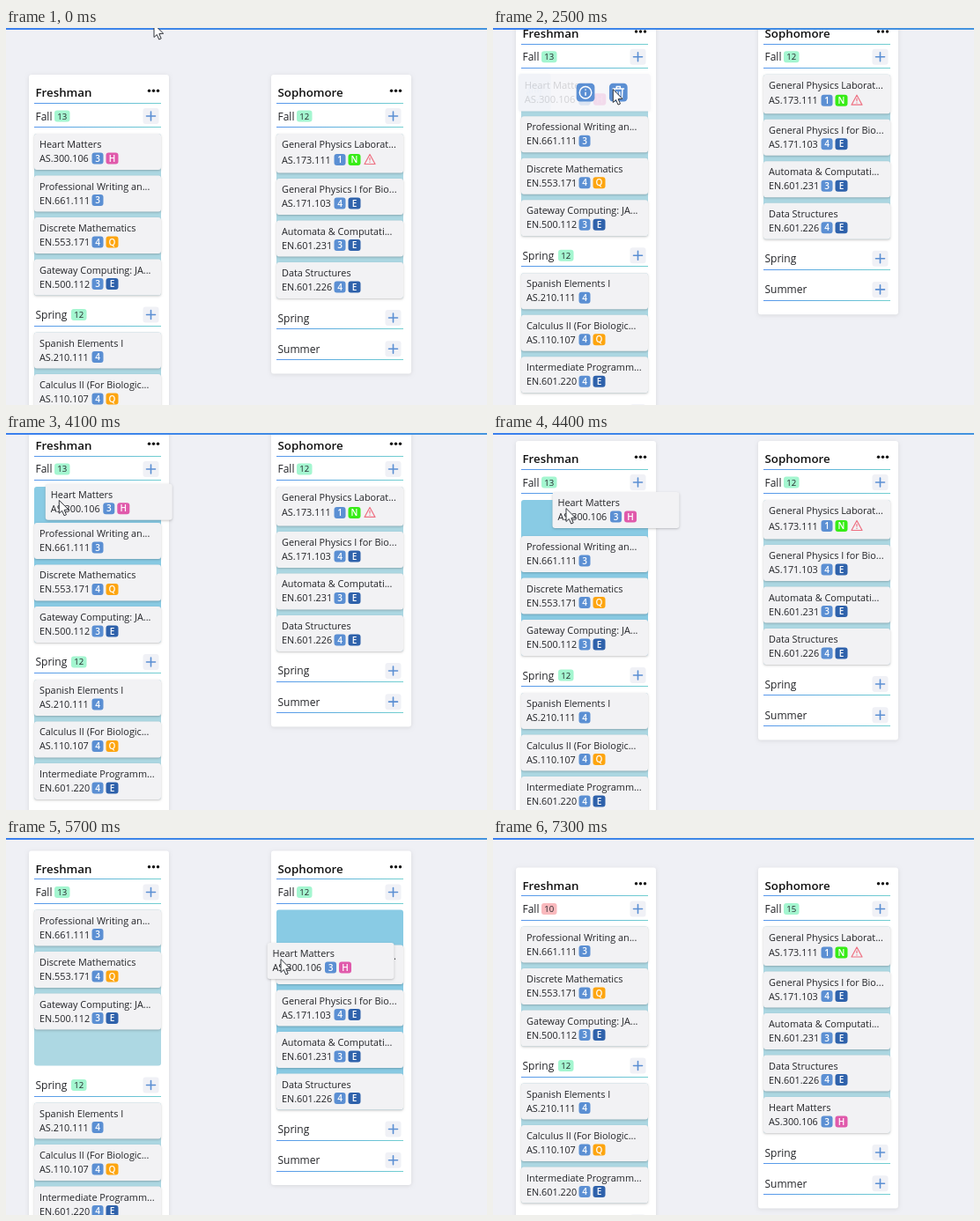
These frames come from a looping animation (546 px wide and 428 px high, 7400 ms). An HTML page with a canvas:

```html
<!DOCTYPE html>
<html lang="en">
<head>
<meta charset="utf-8">
<title>Course planner</title>
<style>
html, body { margin: 0; width: 100%; height: 100%; overflow: hidden; background: #eff0f5; }
canvas { display: block; width: 546px; height: 428px; }
</style>
</head>
<body>
<canvas id="stage"></canvas>
<script>
const W = 546, H = 428, LOOP = 7400;
const CARD_W = 144, CARD_H = 41, GAP = 6.5;
const GRAB = 3750, DROP = 5700, SETTLED = 6000, SAVED = 6400;
const INK = '#222327', BLUE = '#5b8fd3', LIST = '#add8e3', LIST_OVER = '#89cbe4';
const FONT = '"Open Sans", "Noto Sans", sans-serif';
const TINTS = { H: '#e05aab', Q: '#fda50f', E: '#2f62ab', N: '#37ec16' };

const canvas = document.getElementById('stage');
const ctx = canvas.getContext('2d');
const dpr = window.devicePixelRatio || 1;
canvas.width = W * dpr;
canvas.height = H * dpr;

const card = (title, code, credits, area, warn) =>
  ({ title, code, credits, area, warn, h: warn ? 44.5 : CARD_H });

const heart = card('Heart Matters', 'AS.300.106', 3, 'H');
const freshFall = [
  card('Professional Writing an...', 'EN.661.111', 3),
  card('Discrete Mathematics', 'EN.553.171', 4, 'Q'),
  card('Gateway Computing: JA...', 'EN.500.112', 3, 'E')
];
const freshSpring = [
  card('Spanish Elements I', 'AS.210.111', 4),
  card('Calculus II (For Biologic...', 'AS.110.107', 4, 'Q'),
  card('Intermediate Programm...', 'EN.601.220', 4, 'E')
];
const sophFall = [
  card('General Physics Laborat...', 'AS.173.111', 1, 'N', true),
  card('General Physics I for Bio...', 'AS.171.103', 4, 'E'),
  card('Automata & Computati...', 'EN.601.231', 3, 'E'),
  card('Data Structures', 'EN.601.226', 4, 'E')
];

// Time, then one or more values; eased between neighbours.
const SCROLL = [[1750, 0], [2450, 67.3], [3900, 67.3], [4400, 44], [4650, 38.5], [6600, 38.5], [7100, 19.5]];
const POINTER = [
  [0, 168, -4], [400, 168, 2], [1250, 142, 131], [1750, 142, 132], [2450, 138, 70],
  [3100, 40, 73], [3500, 38, 73], [3750, 47, 72], [4000, 56, 75], [4400, 83, 86],
  [5100, 284, 126], [5600, 312, 138], [6450, 312, 138], [6900, 296, -24]
];

const clamp = v => Math.max(0, Math.min(1, v));
const ease = v => v * v * (3 - 2 * v);
const ramp = (t, from, to) => ease(clamp((t - from) / (to - from)));
const mix = (a, b, k) => a + (b - a) * k;

function track(keys, t) {
  let i = 0;
  while (i < keys.length - 2 && t > keys[i + 1][0]) i++;
  const a = keys[i], b = keys[i + 1], k = ramp(t, a[0], b[0]);
  return a.slice(1).map((v, n) => mix(v, b[n + 1], k));
}

function box(x, y, w, h, r, fill) {
  ctx.fillStyle = fill;
  ctx.beginPath();
  ctx.roundRect(x, y, w, h, r);
  ctx.fill();
}

function shadow(alpha, blur, dy) {
  ctx.shadowColor = `rgba(0,0,0,${alpha})`;
  ctx.shadowBlur = blur * dpr;
  ctx.shadowOffsetY = dy * dpr;
}

function label(str, x, y, size, color = INK, weight = 400, align = 'left') {
  ctx.font = `${weight} ${size}px ${FONT}`;
  ctx.textAlign = align;
  ctx.fillStyle = color;
  ctx.fillText(str, x, y);
}

function stroke(color, width, build) {
  ctx.strokeStyle = color;
  ctx.lineWidth = width;
  ctx.lineCap = ctx.lineJoin = 'round';
  ctx.beginPath();
  build();
  ctx.stroke();
}

function poly(points) {
  points.forEach(([x, y], i) => i ? ctx.lineTo(x, y) : ctx.moveTo(x, y));
}

function gradient(x, w, ...colors) {
  const g = ctx.createLinearGradient(x, 0, x + w, 0);
  colors.forEach((c, i) => g.addColorStop(i / (colors.length - 1), c));
  return g;
}

function rule(x, y) {
  ctx.fillStyle = gradient(x, CARD_W, '#5796ec', '#62b4dc', '#72cfd0');
  ctx.fillRect(x, Math.floor(y), CARD_W, 1);
}

function badge(str, x, y, w, fill) {
  box(x, y, w, 13, 3, fill);
  label(str, x + w / 2, y + 10.2, 10, '#fff', 600, 'center');
}

function cardText(c, x, y) {
  const dy = c.warn ? 1.5 : 0;
  label(c.title, x + 6, y + 16, 10.85);
  label(c.code, x + 6, y + 32 + dy, 10.85);
  badge(c.credits, x + 65.5, y + 21.5 + dy, 13, BLUE);
  if (c.area) badge(c.area, x + 81.5, y + 21.5 + dy, 14, TINTS[c.area]);
  if (c.warn) {
    stroke('#ee6f80', 1.2, () => {
      poly([[x + 106, y + 23.5], [x + 112, y + 34.5], [x + 100, y + 34.5]]);
      ctx.closePath();
      poly([[x + 106, y + 27.5], [x + 106, y + 30]]);
      poly([[x + 106, y + 32.2], [x + 106, y + 32.4]]);
    });
  }
}

function cardBase(c, x, y, fill = '#f2f2f4', depth = 0.22) {
  ctx.save();
  shadow(depth, 2.5, 1);
  box(x, y, CARD_W, c.h, 3, fill);
  ctx.restore();
}

function drawCard(c, x, y) {
  cardBase(c, x, y);
  cardText(c, x, y);
}

function hand(x, y, fill, line) {
  const outline = () => {
    ctx.moveTo(x - 3, y + 8);
    ctx.lineTo(x - 8, y + 1);
    ctx.quadraticCurveTo(x - 7.5, y - 2, x - 4.5, y + 1);
    ctx.lineTo(x - 5.5, y - 5);
    ctx.quadraticCurveTo(x - 4, y - 8, x - 2.5, y - 5);
    ctx.lineTo(x - 2, y - 7);
    ctx.quadraticCurveTo(x - 0.5, y - 10, x + 1, y - 7);
    ctx.lineTo(x + 1.5, y - 6);
    ctx.quadraticCurveTo(x + 3.5, y - 9, x + 4.5, y - 5);
    ctx.quadraticCurveTo(x + 7.5, y - 6.5, x + 7.5, y - 2);
    ctx.quadraticCurveTo(x + 7.5, y + 4, x + 4.5, y + 8);
    ctx.closePath();
  };
  ctx.fillStyle = fill;
  ctx.beginPath();
  outline();
  ctx.fill();
  stroke(line, 1, () => {
    outline();
    for (const dx of [-2, 1.2, 4.3]) poly([[x + dx, y - 4], [x + dx, y]]);
  });
}

function tools(x, y, grip) {
  const my = y + CARD_H / 2;
  ctx.save();
  ctx.globalAlpha *= 0.04 + 0.9 * grip;
  box(x - 1.2, y - 0.4, 36, CARD_H + 0.8, 3, '#7aaae8');
  hand(x + 16.5, my, '#fff', '#7aaae8');
  ctx.restore();

  box(x + 63, my - 10, 20, 20, 4, BLUE);
  stroke('#fff', 1.4, () => {
    ctx.arc(x + 73, my, 6.5, 0, 7);
    poly([[x + 73, my], [x + 73, my + 3]]);
    poly([[x + 73, my - 3], [x + 73, my - 2.9]]);
  });

  box(x + 99, my - 10, 20, 20, 4, BLUE);
  const cx = x + 109;
  stroke('#fff', 1.4, () => {
    poly([[cx - 6, my - 4], [cx + 6, my - 4]]);
    poly([[cx - 2, my - 4], [cx - 2, my - 6.5], [cx + 2, my - 6.5], [cx + 2, my - 4]]);
    poly([[cx - 4.5, my - 4], [cx - 4, my + 6.5], [cx + 4, my + 6.5], [cx + 4.5, my - 4]]);
    poly([[cx - 1.5, my - 0.5], [cx - 1.5, my + 3.5]]);
    poly([[cx + 1.5, my - 0.5], [cx + 1.5, my + 3.5]]);
  });
}

function hoverCard(c, x, y, k, grip) {
  if (!k) return drawCard(c, x, y);
  const cx = x + CARD_W / 2, cy = y + c.h / 2, s = 1 + 0.035 * k;
  ctx.save();
  ctx.translate(cx, cy);
  ctx.scale(s, s);
  ctx.translate(-cx, -cy);
  cardBase(c, x, y, '#f6f6f9', 0.22 - 0.16 * k);
  ctx.globalAlpha = 1 - 0.83 * k ** 1.4;
  cardText(c, x, y);
  ctx.globalAlpha = k;
  tools(x, y, grip);
  ctx.restore();
}

const listHeight = s => s.cards.reduce((sum, c) => sum + c.h + GAP, -GAP) + (s.extra || 0);
const sectionHeight = s => s.cards ? listHeight(s) + 42 : 35.2;

function drawSection(s, x, y, state) {
  label(s.name, x + 1.5, y + 4.5, 12);
  if (s.count) {
    const bx = x + (s.name === 'Fall' ? 23 : 42);
    box(bx, y - 6.5, 17.5, 13, 3, s.count < 12 ? '#f9b9bd' : '#a4f6d0');
    label(s.count, bx + 8.75, y + 3.5, 9.6, INK, 400, 'center');
  }
  box(x + 123.5, y - 9, 18, 18, 3, '#f0f1f6');
  stroke(BLUE, 1.6, () => {
    poly([[x + 127.5, y], [x + 137.5, y]]);
    poly([[x + 132.5, y - 5], [x + 132.5, y + 5]]);
  });
  rule(x, y + 12.5);
  if (!s.cards) return;

  let top = y + 20;
  box(x, top, CARD_W, listHeight(s), 3, s.over ? LIST_OVER : LIST);
  top += s.lead || 0;
  for (const c of s.cards) {
    if (c === heart) hoverCard(c, x, top, state.hover, state.grip);
    else drawCard(c, x, top);
    top += c.h + GAP;
  }
}

function drawColumn(title, x, scroll, sections, state) {
  const height = sections.reduce((sum, s) => sum + sectionHeight(s), 40.2);
  const top = 53 - scroll;
  ctx.save();
  shadow(0.1, 4, 1);
  box(x, top, 159, height, 3, '#fff');
  ctx.restore();
  label(title, x + 7.5, top + 25.3, 13.3, '#111', 600);
  ctx.fillStyle = '#111';
  for (const dx of [136.5, 141.5, 146.5]) {
    ctx.beginPath();
    ctx.arc(x + dx, top + 18.3, 1.7, 0, 7);
    ctx.fill();
  }
  rule(x + 6, top + 32.3);
  let y = top + 47;
  for (const s of sections) {
    drawSection(s, x + 6, y, state);
    y += sectionHeight(s);
  }
}

function arrow(x, y) {
  const shape = () => {
    poly([[0, 0], [0, 14.5], [3.3, 11.5], [5.7, 17], [8.2, 16], [5.8, 10.6], [10.3, 10.3]]
      .map(([dx, dy]) => [x + dx, y + dy]));
    ctx.closePath();
  };
  ctx.fillStyle = '#fff';
  ctx.beginPath();
  shape();
  ctx.fill();
  stroke('#33363d', 1, shape);
}

function draw(t) {
  const [scroll] = track(SCROLL, t);
  const [px, py] = track(POINTER, t);
  const dragging = t >= GRAB && t < SETTLED;
  const saved = t >= SAVED;
  const state = {
    hover: t < GRAB ? ramp(t, 1230, 1580) : 0,
    grip: ramp(t, 2850, 3050)
  };
  const left = ramp(t, 4620, 4820);
  const opened = dragging ? 40 * ramp(t, 4800, 5000) : 0;

  const fresh = [
    {
      name: 'Fall', count: saved ? 10 : 13,
      cards: dragging || saved ? freshFall : [heart, ...freshFall],
      lead: dragging ? CARD_H * (1 - left) : 0,
      extra: t >= GRAB && !saved ? CARD_H : 0,
      over: dragging && t < 4650
    },
    { name: 'Spring', count: 12, cards: freshSpring },
    { name: 'Summer' }
  ];
  const soph = [
    {
      name: 'Fall', count: saved ? 15 : 12,
      cards: saved ? [...sophFall, heart] : sophFall,
      lead: opened, extra: opened,
      over: dragging && t >= 4800
    },
    { name: 'Spring' },
    { name: 'Summer' }
  ];

  ctx.setTransform(dpr, 0, 0, dpr, 0, 0);
  ctx.fillStyle = '#eff0f5';
  ctx.fillRect(0, 0, W, H);
  drawColumn('Freshman', 26, scroll, fresh, state);
  drawColumn('Sophomore', 301, scroll, soph, state);

  if (dragging) {
    const k = ramp(t, DROP, SETTLED - 50);
    drawCard(heart, mix(px - 15.5, 307, k), mix(py - 19, 120 - scroll, k));
  }

  ctx.fillStyle = gradient(0, W, '#3b80ee', '#4594de');
  ctx.fillRect(0, 0, W, 2);

  if (t > 2950 && t < GRAB) hand(px, py, '#fff', '#222');
  else arrow(px, py);
}

const start = performance.now();
function frame() {
  draw((performance.now() - start) % LOOP);
  requestAnimationFrame(frame);
}
frame();
</script>
</body>
</html>
```
